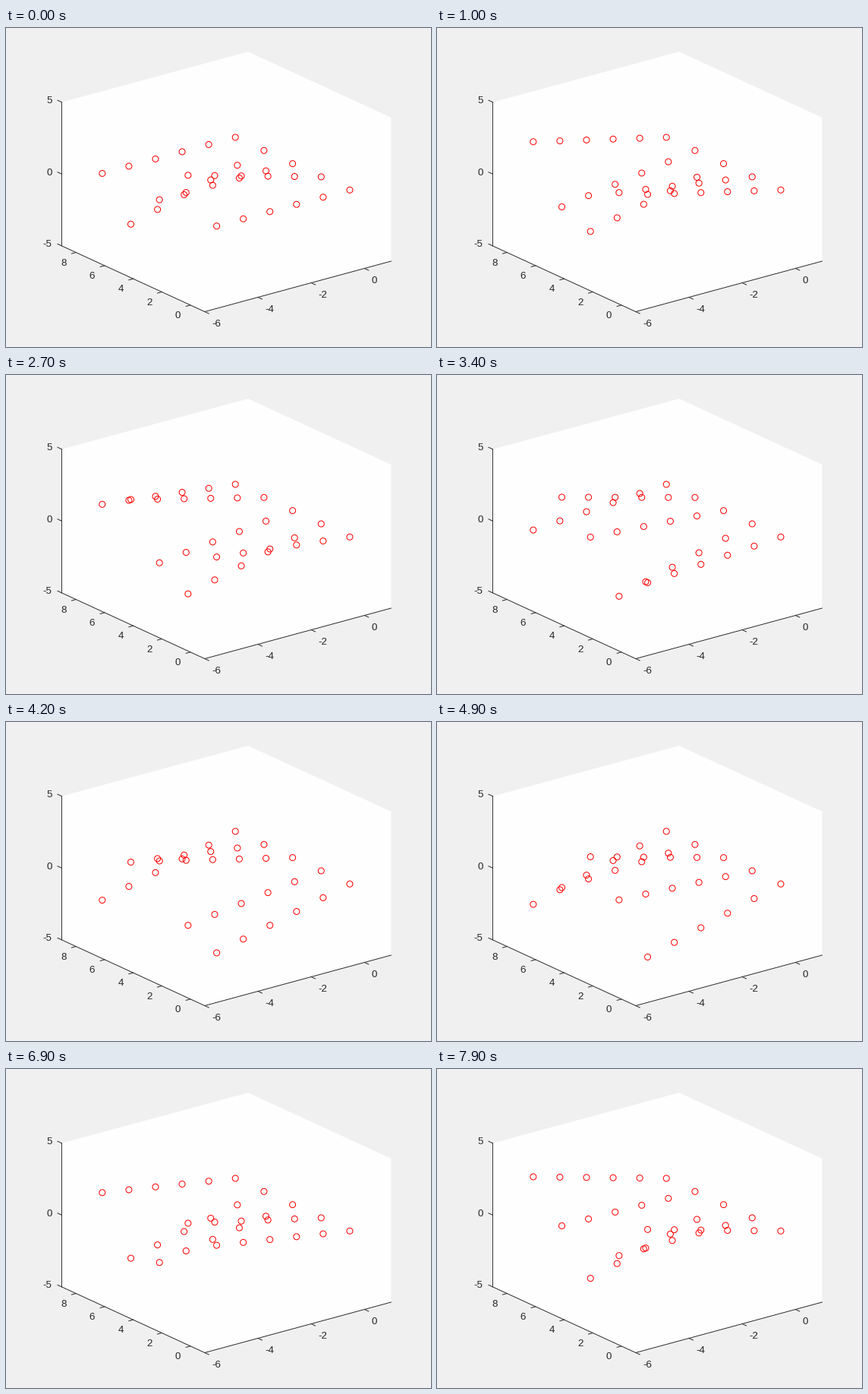
A matplotlib script for the animation above (8000 ms loop, 560x420 px).

```python
import matplotlib.pyplot as plt
import numpy as np
from matplotlib.animation import FuncAnimation

W, H, DPI = 560, 420, 100
PT = 72 / DPI  # points per pixel
INK = "0.15"
FRAMES, STEP = 80, 0.1

# Axes box in pixels, seen from azimuth -37.5 and elevation 30, stretched to fit
LEFT, TOP, BOX_W, BOX_H = 73.4, 31.2, 434, 342.3
c, s = np.cos(np.radians(37.5)), np.sin(np.radians(37.5))
tilt, rise = np.sin(np.radians(30)), np.cos(np.radians(30))
kx = BOX_W / (c + s)
ky = BOX_H / ((c + s) * tilt + rise)
X0, X1, Y0, Y1, Z0, Z1 = -6, 1, -1, 9, -5, 5


def project(x, y, z):
    u = (x - X0) / (X1 - X0)
    v = (y - Y0) / (Y1 - Y0)
    w = (z - Z0) / (Z1 - Z0)
    px = LEFT + kx * (s + u * c - v * s)
    py = TOP + BOX_H - ky * (tilt * (u * s + v * c) + rise * w)
    return px, py


fig = plt.figure(figsize=(W / DPI, H / DPI), dpi=DPI, facecolor="#f0f0f0")
ax = fig.add_axes([0, 0, 1, 1])
ax.set(xlim=(0, W), ylim=(H, 0))
ax.axis("off")


def line(pts):
    ax.plot(*zip(*pts), color=INK, lw=0.95 * PT, solid_joinstyle="miter")


def tick(pos, toward, label, dx, dy, ha):
    p = np.array(project(*pos))
    d = np.array(project(*toward)) - p
    line([p, p + 6 * d / np.hypot(*d)])
    ax.text(p[0] + dx, p[1] + dy, str(label), color=INK, ha=ha, va="baseline",
            family="Liberation Sans", size=13.33 * PT)


walls = [(X0, Y1, Z1), (X1, Y1, Z1), (X1, Y0, Z1),
         (X1, Y0, Z0), (X0, Y0, Z0), (X0, Y1, Z0)]
ax.fill(*zip(*[project(*p) for p in walls]), color="#fefefe", lw=0)
line([project(*walls[i]) for i in (0, 5, 4, 3)])

for v in (-6, -4, -2, 0):
    tick((v, Y0, Z0), (v, Y0 - 1, Z0), v, 9.5, 19.2, "left")
for v in (0, 2, 4, 6, 8):
    tick((X0, v, Z0), (X0 - 1, v, Z0), v, -12.8, 17, "right")
for v in (-5, 0, 5):
    tick((X0, Y1, v), (X0, Y1 + 1, v), v, -12.6, 1.4, "right")

# Five rays of six points, each a quarter turn out of phase with the next
ray, dist = np.meshgrid(np.arange(5), np.arange(6))
dots = ax.scatter([], [], s=(8 * PT) ** 2, facecolors="none",
                  edgecolors="red", linewidths=PT)


def draw(i):
    slope = np.pi / 6 * np.sin(STEP * i - ray * np.pi / 2)
    px, py = project(-dist, 8 - 2 * ray, dist * slope)
    dots.set_offsets(np.column_stack([px.ravel() - 0.5, py.ravel()]))
    return (dots,)


anim = FuncAnimation(fig, draw, frames=FRAMES, interval=100, repeat=True,
                     repeat_delay=0)
plt.show()
```
